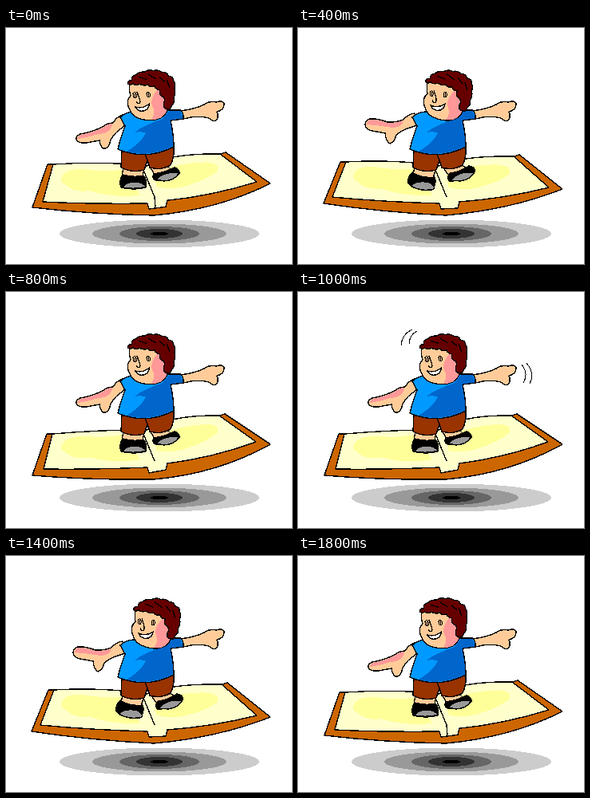
Write an HTML page that moves like this. It is 358 px wide and 296 px high and loops after 1900 ms.

```html
<!DOCTYPE html>
<html lang="en">
<head>
<meta charset="utf-8">
<title>Flying book</title>
<style>
html, body { margin: 0; width: 100%; height: 100%; overflow: hidden; background: #fff; }
svg { display: block; width: 358px; height: 296px; shape-rendering: crispEdges; }
path { fill: none; stroke: #000; stroke-width: 1.4; stroke-linejoin: round; stroke-linecap: round; }
#marks path { stroke-width: 1; }
path.flat { stroke: none; }
.cover { fill: #c60; }
.page { fill: #ffc; }
.glow { fill: #ff9; }
.skin { fill: #fc9; }
.pink { fill: #f99; }
.shirt { fill: #09f; }
.shade { fill: #06c; }
.shorts { fill: #930; }
.hair { fill: #600; }
.white { fill: #fff; }
.black { fill: #000; }
.sole { fill: #999; }
.off { display: none; }
</style>
</head>
<body>
<svg viewBox="0 0 358 296">
  <g id="shadow"></g>
  <g id="books"></g>
  <g id="legs">
    <g data-pose="tilt">
      <path class="skin" d="M147 174L145 186Q157 191 171 186L173 176Z"/>
      <path class="skin" d="M179 172L186 184Q200 183 206 177L201 172Z"/>
      <path class="black" d="M146 184Q141 191 144 200Q160 204 175 200Q177 190 172 185Q160 188 146 184Z"/>
      <path class="sole" d="M146 200Q150 193 162 193Q172 194 175 199Q162 203 146 200Z"/>
      <path class="black" d="M185 183Q182 189 187 191Q208 193 217 183Q218 177 211 175Q199 181 185 183Z"/>
      <path class="sole" d="M188 190Q199 179 216 182Q212 191 198 192Z"/>
    </g>
    <g data-pose="level">
      <path class="skin" d="M147 174L143 184Q155 191 169 188L173 176Z"/>
      <path class="skin" d="M180 172L188 184Q202 182 210 175L205 172Z"/>
      <path class="black" d="M143 181Q137 186 138 195Q151 205 168 203Q174 195 171 187Q155 189 143 181Z"/>
      <path class="sole" d="M141 198Q150 190 165 194Q172 198 170 202Q155 206 141 198Z"/>
      <path class="black" d="M190 182Q186 187 189 192Q213 192 221 181Q222 174 214 173Q202 181 190 182Z"/>
      <path class="sole" d="M191 191Q203 178 220 182Q216 190 203 192Z"/>
    </g>
    <path class="shorts" d="M145 153L144 175Q157 182 173 178L177 166L180 175Q194 179 206 172Q211 162 210 150L176 156Z"/>
    <path d="M177 166L174 158"/>
  </g>
  <g id="arms"></g>
  <path class="skin" d="M219 104Q239 101 248 96Q255 91 263 93Q273 90 273 96Q273 103 264 105Q267 112 263 116Q259 118 254 113Q240 109 222 114Z"/>
  <path class="shirt" d="M159 105Q149 106 143 112L149 123Q143 139 140 152Q175 167 210 149Q210 133 206 116L222 114Q223 108 219 103L203 103Z"/>
  <path class="shade flat" d="M204 104L196 114Q172 122 161 131Q170 129 175 132Q168 145 151 155Q180 163 209.5 148Q209 132 205 115.5L221.5 113.5L218.5 103.5Z"/>
  <g id="head">
    <path class="skin" d="M158 70Q157 78 159 84Q154 89 155 95Q157 104 163 110Q176 118 191 115Q202 112 205 102L199 75L177 63Z"/>
    <path class="pink flat" d="M192 78Q182 91 186 99Q190 107 184 115Q200 116 204 102L198 80Z"/>
    <path class="hair" d="M156 69Q155 65 161 65Q160 59 167 58Q170 54 177 55Q184 51 188 54Q195 52 199 56Q206 56 207 61Q214 62 213 67Q216 71 214 77Q216 82 213 88Q214 95 210 98Q209 104 203 102Q199 101 200 95Q203 89 198 86Q194 85 196 78Q191 78 189 73Q184 75 181 71Q176 73 171 70Q165 72 162 69Q159 72 156 69Z"/>
    <path d="M170 61L179 64M182 58L191 64M196 62L202 68M205 67L208 75"/>
    <path d="M167 80Q172 91 170 94Q167 95 166 92"/>
    <path class="white" d="M164 98Q173 102 182 95Q181 104 172 104Q166 103 164 98Z"/>
    <path class="skin" style="stroke-width:1" d="M162 82Q164 78 166 82Q167 87 164 87Q162 86 162 82ZM179 82Q181 78 183 82Q184 87 181 87Q179 86 179 82Z"/>
    <path d="M164.500 82V85M181.500 82V85"/>
  </g>
  <g id="marks">
    <path data-marks="top" d="M160 38Q166 36 173 41M154 48Q156 45 161 44M273 82Q280 85 282 92M281 77Q288 79 290 87"/>
    <path data-marks="wide" d="M129 67Q130 53 143 47M139 65Q140 53 149 49M280 91Q289 102 282 114M286 89Q297 102 290 115"/>
    <path data-marks="low" d="M128 68Q131 54 146 52M134 69Q135 59 141 56M283 96Q291 101 291 112M290 94Q297 101 295 112"/>
  </g>
</svg>
<script>
const $ = id => document.getElementById(id);
const shape = (cls, d, extra = '') => `<path class="${cls}" d="${d}" ${extra}/>`;

// half width, half height, grey
$('shadow').innerHTML = [[125, 17.5, '#ccc'], [84, 12.5, '#999'], [50, 9, '#666'], [29, 6, '#333'], [12, 2, '#000']]
  .map(([rx, ry, c]) => `<ellipse cx="192" cy="258" rx="${rx}" ry="${ry}" fill="${c}"/>`).join('');

// each side: top, outer corner, inner corner
const books = {
  rise:  { left: [[52, 171], [33, 225], [46, 218]], right: [[275, 156], [331, 195], [314, 193]] },
  even:  { left: [[53, 168], [32, 220], [43, 212]], right: [[277, 159], [331, 202], [314, 200]] },
  dip:   { left: [[54, 163], [30, 212], [43, 206]], right: [[278, 164], [331, 209], [312, 206]] },
  steep: { left: [[51, 178], [33, 230], [47, 222]], right: [[274, 153], [331, 191], [313, 188]] }
};

const leftGlow = 'M-108-8Q-104-18-82-18Q-50-14-28-19L-10 14Q-45 18-74 9Q-92 12-102 3Q-112-2-108-8Z';
const rightGlow = 'M8-14Q40-20 74-14Q92-9 86 0Q72 8 52 10Q30 14 10 5Z';

function book(name, { left: [lt, lc, li], right: [rt, rc, ri] }) {
  const [x, y] = lt, [u, v] = rt;
  const back = `L${u - 7} ${v + 2}Q205 ${v + 1} 176 173Q125 ${y * .8 + 30} ${x + 7} ${y}`;
  const cover = `M${lt}L${lc}Q105 ${lc[1] / 2 + 121} 185 235Q265 228 ${rc}L${rt}${back}Z`;
  const notch = ri[1] / 4 + 168;
  const page = `M${x + 7} ${y}L${li}Q105 ${li[1] / 2 + 112} 177 220L179 227L200 ${notch + 8}L202 ${notch}Q258 ${ri[1] / 2 + 114} ${ri}${back}Z`;
  const glow = (d, rise, run) => shape('glow flat', d,
    `transform="translate(178 196) skewY(${Math.atan2(rise, run) * 180 / Math.PI})"`);
  return `<g data-book="${name}">${shape('cover', cover)}${shape('page', page)}`
    + glow(leftGlow, 196 - (y + li[1]) / 2, 123)
    + glow(rightGlow, (v + ri[1]) / 2 - 196, 117)
    + shape('', 'M170 173L186 212' + (name === 'rise' ? 'L187 224' : '')) + '</g>';
}
$('books').innerHTML = Object.entries(books).map(([n, b]) => book(n, b)).join('');

// front arm and its blush
const arms = {
  left: [
    'M146 109Q138 112 134 119Q127 119 121 124Q106 131 93 133Q87 136 88 140Q91 145 101 144L117 141Q118 149 122 151Q128 152 130 144Q131 138 138 131L149 122Z',
    'M133 120Q127 120 121 125Q106 132 93 134Q90 136 90 139Q103 137 116 133Q132 132 133 120Z'
  ],
  mid: [
    'M146 109Q140 112 134 118Q125 123 112 122Q96 120 90 121Q84 123 84 127Q86 134 95 134L112 136Q114 145 119 147Q124 145 126 137Q133 132 137 129L149 122Z',
    'M133 119Q125 124 112 123Q96 121 90 122Q86 124 86 128Q104 127 120 130Q133 129 133 119Z'
  ],
  right: [
    'M146 107Q138 108 132 115Q122 119 112 118Q98 113 90 114Q84 116 84 121Q85 128 93 129L109 132Q110 142 115 145Q121 143 123 134Q131 128 137 126L149 122Z',
    'M131 116Q122 120 112 119Q98 114 90 115Q86 117 86 121Q101 122 118 125Q132 124 131 116Z'
  ]
};
$('arms').innerHTML = Object.entries(arms).map(([n, [arm, blush]]) =>
  `<g data-arms="${n}">${shape('skin', arm)}${shape('pink flat', blush)}</g>`).join('');

const heads = {
  left: 'translate(-2 0) rotate(-2 182 112)',
  mid: '',
  right: 'translate(1 0) rotate(4 182 112)'
};

// book, lean, motion marks; one step per 200 ms
const steps = [
  ['rise', 'left'], ['dip', 'mid', 'top'], ['even', 'right'], ['steep', 'mid'], ['steep', 'left'],
  ['steep', 'left', 'wide'], ['steep', 'mid'], ['even', 'right'], ['dip', 'mid', 'low'], ['rise', 'left']
];

function show(key, value) {
  document.querySelectorAll(`[data-${key}]`).forEach(el =>
    el.classList.toggle('off', el.dataset[key] !== value));
}

let last = -1;
function draw(now) {
  const i = Math.floor(now % 1900 / 200);
  if (i !== last) {
    const [cover, lean, marks] = steps[last = i];
    show('book', cover);
    show('arms', lean);
    show('pose', lean === 'left' ? 'tilt' : 'level');
    show('marks', marks);
    $('head').setAttribute('transform', heads[lean]);
  }
  requestAnimationFrame(draw);
}
draw(performance.now());
</script>
</body>
</html>
```
